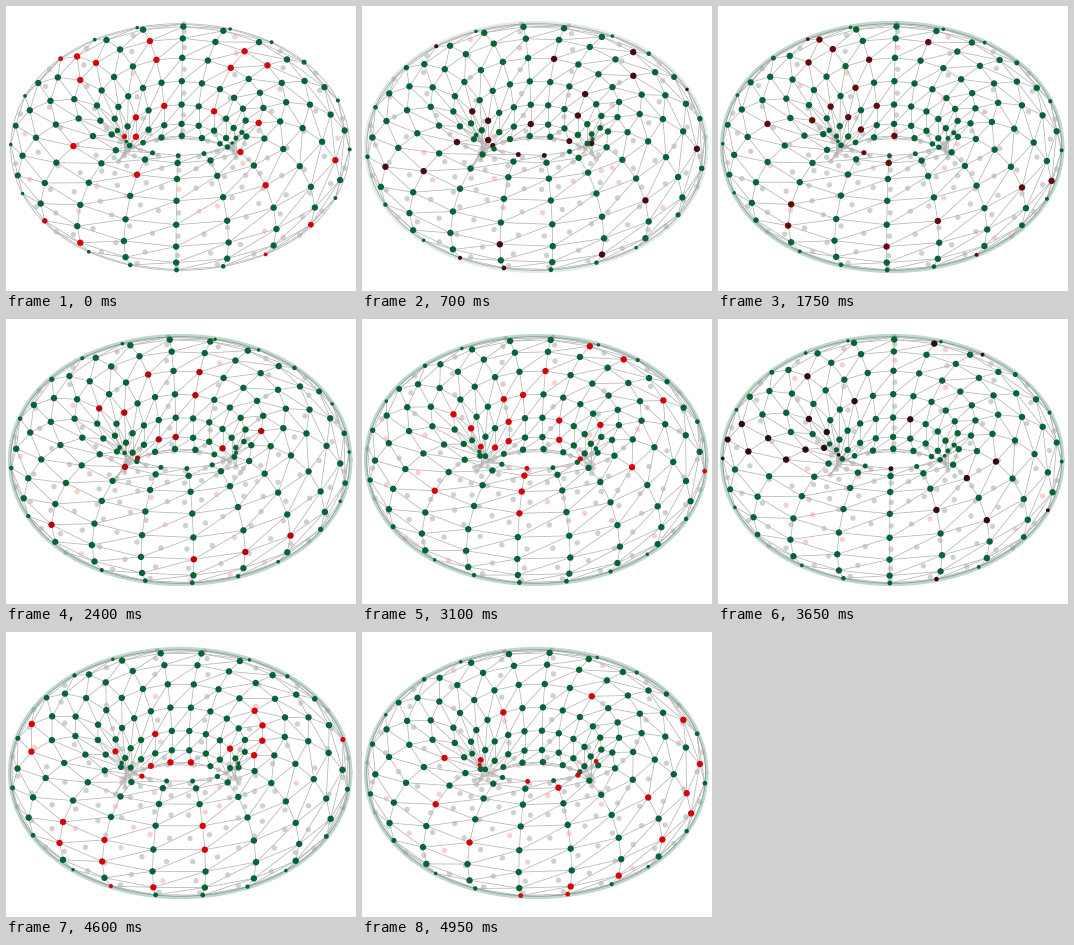
Animation, 350 px wide and 285 px high, one loop 5 s. Source, as a matplotlib script:

```python
import numpy as np
import matplotlib.pyplot as plt
from matplotlib.animation import FuncAnimation
from matplotlib.collections import LineCollection

W, H, DPI = 350, 285, 100
FRAMES, INTERVAL = 100, 50
PX = 72 / DPI                        # one pixel in points
COLS, ROWS = 20, 15
R, TUBE = 112, 57.5                  # torus radii in pixels
CX, CY = 174.2, 141
TILT = np.radians(36)
START, SPIN = -1.4, 0.5              # degrees, degrees per frame
PERIOD, LEAD = 10, 7                 # frames per generation, head start
DENSITY = 0.15                       # share of lit nodes

GREEN = np.array([0.02, 0.39, 0.21])
RED = np.array([0.84, 0.01, 0.04])
DARK = np.array([0.14, 0.05, 0.06])
PALE = np.array([0.81, 0.82, 0.815])
PINK = np.array([0.97, 0.82, 0.82])
LINE = "#b4b4b4"

col, row = [a.ravel() for a in np.meshgrid(np.arange(COLS), np.arange(ROWS), indexing="ij")]


def node(c, r):
    return (c % COLS) * ROWS + r % ROWS


across = node(col + 1, row + 1)
tris = np.concatenate([np.stack([node(col, row), node(col + 1, row), across], 1),
                       np.stack([node(col, row), across, node(col, row + 1)], 1)])

# Each generation lights its own random nodes.
rng = np.random.default_rng(8)
lit = rng.random(((FRAMES + LEAD) // PERIOD + 1, COLS * ROWS)) < DENSITY


def project(k):
    """Screen points, how far each node faces the viewer, and what is in sight."""
    u = np.radians(START + SPIN * k + col * 360 / COLS)
    v = np.radians(row * 360 / ROWS)
    rho = R + TUBE * np.cos(v)
    x, y, z = rho * np.sin(u), rho * np.cos(u), TUBE * np.sin(v)
    s, c = np.sin(TILT), np.cos(TILT)
    points = np.stack([CX + x, CY + y * s - z * c], 1)
    facing = np.cos(v) * np.cos(u) * c + np.sin(v) * s

    # A node is hidden when its line of sight passes through the tube.
    t = np.linspace(4, 330, 90)[:, None]
    gap = np.hypot(np.hypot(x, y + t * c) - R, z + t * s)
    visible = gap.min(axis=0) > 0.996 * TUBE
    return points, facing, visible


def edges_of(faces):
    pairs = np.concatenate([faces[:, [0, 1]], faces[:, [1, 2]], faces[:, [2, 0]]])
    return np.unique(np.sort(pairs, axis=1), axis=0)


def outline(width):
    """Outer silhouette: the tilted core circle pushed out along its normal."""
    t = np.linspace(0, 2 * np.pi, 240)
    s = np.sin(TILT)
    nx, ny = s * np.cos(t), np.sin(t)
    n = np.hypot(nx, ny)
    return CX + R * np.cos(t) + width * nx / n, CY + R * s * np.sin(t) + width * ny / n


fig = plt.figure(figsize=(W / DPI, H / DPI), dpi=DPI, facecolor="white")
ax = fig.add_axes([0, 0, 1, 1])
ax.set(xlim=(0, W), ylim=(H, 0))
ax.axis("off")

back_dots = ax.scatter([], [], s=(5.4 * PX) ** 2, lw=0, zorder=1)
mesh = LineCollection([], colors=LINE, linewidths=0.75 * PX, zorder=2)
ax.add_collection(mesh)
ax.plot(*outline(TUBE), color=LINE, lw=0.8 * PX, zorder=2)
halo, = ax.plot(*outline(TUBE + 1), color=GREEN, lw=3.5 * PX, alpha=0, zorder=2.5)
front_dots = ax.scatter([], [], s=1, lw=0, zorder=3)


def draw(k):
    points, facing, visible = project(k)
    generation, phase = divmod(k + LEAD, PERIOD)
    on = lit[generation][:, None]

    seen = tris[(facing[tris].mean(axis=1) > 0) & visible[tris].any(axis=1)]
    mesh.set_segments(points[edges_of(seen)])

    back_dots.set_offsets(points[~visible])
    back_dots.set_facecolor(np.where(on, PINK, PALE)[~visible])

    # Lit nodes brighten from dark to full red, then hold.
    glow = DARK + (RED - DARK) * min(1, 0.05 + 0.155 * phase)
    size = 6.4 * PX * np.clip(0.6 + 1.5 * facing, 0.55, 1)
    front_dots.set_offsets(points[visible])
    front_dots.set_sizes(size[visible] ** 2)
    front_dots.set_facecolor(np.where(on, glow, GREEN)[visible])

    halo.set_alpha(0.25 * min(1, k / 30))
    return back_dots, mesh, halo, front_dots


anim = FuncAnimation(fig, draw, frames=FRAMES, interval=INTERVAL, repeat=True,
                     repeat_delay=0, blit=False)
plt.show()
```
